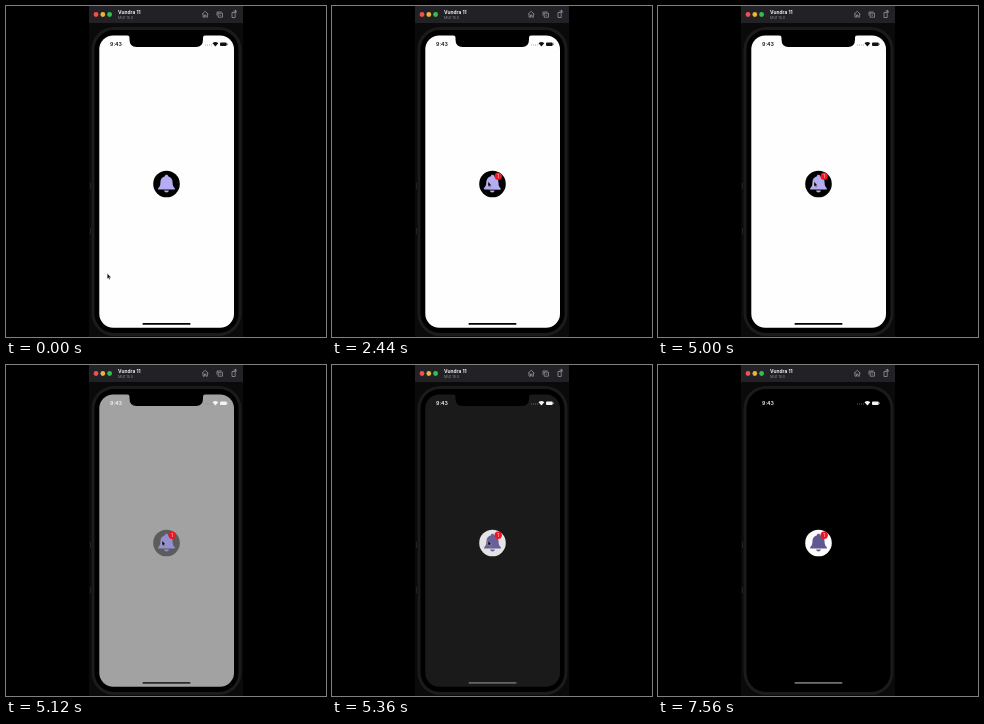
Write an HTML page that moves like this. It is 320 px wide and 331 px high and loops after 7.76 s.

```html
<!DOCTYPE html>
<html lang="en">
<head>
<meta charset="utf-8">
<style>
  html, body { margin: 0; width: 100%; height: 100%; overflow: hidden; background: #000; }
  svg { display: block; width: 100vw; height: 100vh; font-family: Inter, Roboto, sans-serif; }
</style>
</head>
<body>
<svg viewBox="0 0 320 331">
  <rect width="320" height="331"/>

  <!-- window -->
  <rect x="83" width="154" height="331" fill="#0a0a0a"/>
  <rect x="83" width="154" height="17" fill="#222126"/>
  <circle cx="90" cy="8.5" r="2.4" fill="#f0504f"/>
  <circle cx="96.8" cy="8.5" r="2.4" fill="#eab33b"/>
  <circle cx="103.6" cy="8.5" r="2.4" fill="#32c14a"/>
  <text x="112" y="8" font-size="4.8" font-weight="700" fill="#f0f0f0">Vundra 11</text>
  <text x="112" y="13" font-size="3.8" fill="#858488">Mur 15.0</text>
  <g fill="none" stroke="#a5a4a8" stroke-width=".7">
    <path d="M196 8.3l3.2-3 3.2 3M197 7.6v3.6h1.5v-2.2h1.4v2.2h1.5V7.6"/>
    <path d="M211 9.6V6h4.6M212.2 7.2h4.3v4h-4.3zM213.6 9.2h1.5"/>
    <path d="M226 6.5h3.2v5h-3.2zM227.5 5h2.6v2M229 4l1.2 1-1.2 1"/>
  </g>

  <!-- phone -->
  <path d="M84.5 177v6M84.5 222v6" stroke="#222" stroke-width="1"/>
  <rect x="87" y="22.5" width="147" height="306" rx="21" stroke="#1b1b1b" stroke-width="3"/>
  <rect id="screen" x="93.3" y="29.5" width="134.7" height="292.3" rx="14"/>
  <path d="M120.500 29h79.500q-3 0-3 3v1.500q0 7.500-7 7.500h-59.500q-7 0-7-7.500v-1.500q0-3-3-3z"/>
  <rect id="home" x="136.500" y="317" width="48" height="1.800" rx=".9"/>
  <g id="status">
    <text x="104" y="40.300" font-size="5.300" font-weight="600">9:43</text>
    <path d="M199 39h.9M201 39h.9M203 39h.9M205 39h.9" stroke="#888" stroke-width=".8"/>
    <path d="M206.500 37.200q2.900-2.300 5.800 0l-2.900 3.200z"/>
    <rect x="214" y="36.400" width="6.700" height="3.600" rx="1"/>
    <rect x="221.100" y="37.400" width=".6" height="1.500" rx=".3"/>
  </g>

  <!-- bell button -->
  <circle id="disc" cx="160.500" cy="178" r="13.300"/>
  <g id="bell">
    <path d="M160.500 168.800c1 0 1.500.6 1.600 1.400 3 .8 4.500 3.200 4.500 6.200 0 3 .6 4 2 5.500.7.800.3 1.700-.7 1.700h-14.800c-1 0-1.400-.9-.7-1.700 1.400-1.500 2-2.500 2-5.500 0-3 1.500-5.400 4.500-6.200.1-.8.600-1.400 1.600-1.400z"/>
    <path d="M158 184.500h5q-.5 2-2.500 2t-2.500-2z"/>
  </g>
  <g id="badge">
    <circle r="3.700" fill="#ee1620"/>
    <text y="1.500" font-size="4.200" text-anchor="middle" fill="#fff">1</text>
  </g>

  <path id="cursor" d="M0 0v5.200l1.200-1 .8 1.900.9-.4-.8-1.800h1.600z" fill="#050505" stroke="#ddd" stroke-width=".35"/>
</svg>
<script>
const LOOP = 7760;
const el = id => document.getElementById(id);
const clamp = v => Math.min(1, Math.max(0, v));
const span = (t, from, to) => clamp((t - from) / (to - from));
const easeOut = p => 1 - (1 - p) ** 2;
const smooth = p => p * p * (3 - 2 * p);
const mix = (a, b, p) => a + (b - a) * p;
const blend = (a, b, p) => `rgb(${a.map((v, i) => Math.round(mix(v, b[i], p)))})`;
const gray = (a, b, p) => blend([a, a, a], [b, b, b], p);

// small swing that dies out by the end of its span
function swing(t, from, to) {
  const p = span(t, from, to);
  return 4 * Math.sin(p * Math.PI * 8) * (1 - p);
}

function draw(t) {
  const dark = easeOut(span(t, 5020, 5520));
  el('screen').setAttribute('fill', gray(254, 0, dark));
  el('disc').setAttribute('fill', gray(0, 254, dark));
  el('home').setAttribute('fill', gray(0, 112, dark));
  el('status').setAttribute('fill', t < 5040 ? '#111' : '#f4f4f4');

  el('bell').setAttribute('fill', blend([181, 173, 243], [94, 89, 145], dark));
  const angle = swing(t, 2200, 4320) + swing(t, 5680, 7080);
  el('bell').setAttribute('transform', `rotate(${angle} 160.5 170)`);

  const pop = easeOut(span(t, 2180, 2380));
  el('badge').setAttribute('transform', `translate(166.2 170.2) scale(${pop})`);

  const move = smooth(span(t, 1340, 2120));
  el('cursor').setAttribute('transform',
    `translate(${mix(101.3, 156, move)} ${mix(267.5, 175.5, move)})`);
  el('cursor').style.display = t < 6480 ? '' : 'none';
}

const start = performance.now();
function tick() {
  draw((performance.now() - start) % LOOP);
  requestAnimationFrame(tick);
}
tick();
</script>
</body>
</html>
```
